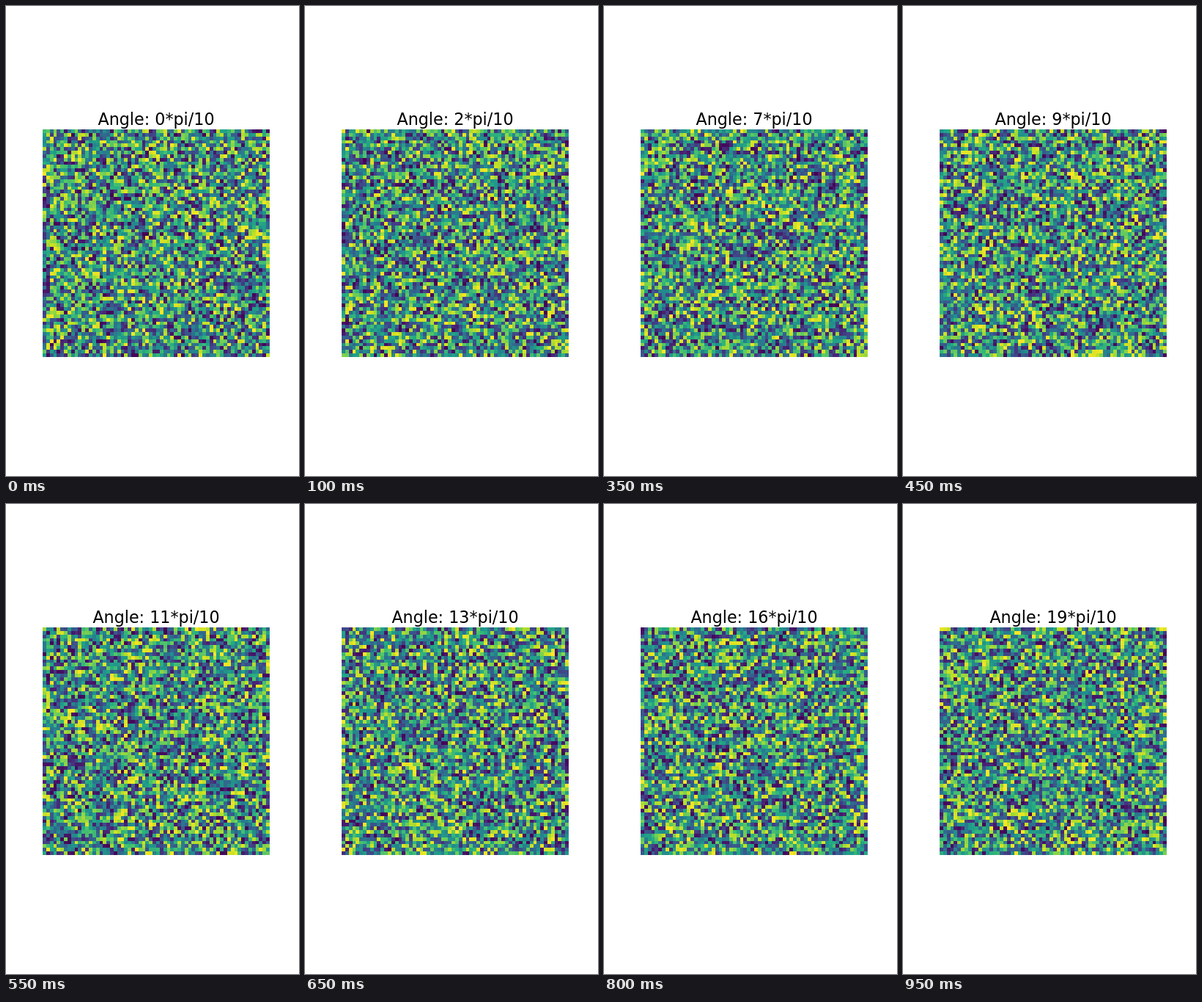
Write an HTML page with a canvas that moves like this. It is 400 px wide and 640 px high and loops after 1 s.

```html
<!DOCTYPE html>
<html lang="en">
<head>
<meta charset="utf-8">
<title>Angle noise</title>
<style>
  html, body { margin: 0; width: 100%; height: 100%; overflow: hidden; background: #fff; }
  canvas, svg { position: absolute; left: 0; top: 0; display: block; }
  text { font: 22.22px "DejaVu Sans", sans-serif; text-anchor: middle; fill: #000; }
</style>
</head>
<body>
<canvas id="grid" width="400" height="640"></canvas>
<svg width="400" height="640" viewBox="0 0 400 640"><text id="title" x="205" y="162">Angle: 0*pi/10</text></svg>
<script>
const LOOP = 1000, STEPS = 20;
const CELLS = 64, LEFT = 50, TOP = 168, SIZE = 310;
const ctx = document.getElementById('grid').getContext('2d');
const title = document.getElementById('title');

// Viridis colour map, evenly spaced stops
const stops = [
  [68, 1, 84], [72, 36, 117], [65, 68, 135], [53, 95, 141], [42, 120, 142],
  [33, 145, 140], [34, 168, 132], [68, 191, 112], [122, 209, 81],
  [189, 223, 38], [253, 231, 37]
];

function viridis(v) {
  const p = v * (stops.length - 1);
  const i = Math.min(Math.floor(p), stops.length - 2);
  const mix = stops[i].map((c, k) => Math.round(c + (stops[i + 1][k] - c) * (p - i)));
  return `rgb(${mix})`;
}

const palette = Array.from({ length: 256 }, (_, i) => viridis(i / 255));
const edge = Array.from({ length: CELLS + 1 }, (_, i) => Math.round(i * SIZE / CELLS));

function seeded(seed) {
  let s = seed;
  return () => {
    s = (s + 0x6D2B79F5) | 0;
    let t = Math.imul(s ^ (s >>> 15), s | 1);
    t ^= t + Math.imul(t ^ (t >>> 7), t | 61);
    return ((t ^ (t >>> 14)) >>> 0) / 4294967296;
  };
}

function draw(step) {
  const rand = seeded(7919 * (step + 1));
  title.textContent = `Angle: ${step}*pi/10`;
  for (let r = 0; r < CELLS; r++) {
    for (let c = 0; c < CELLS; c++) {
      ctx.fillStyle = palette[Math.floor(rand() * 256)];
      ctx.fillRect(LEFT + edge[c], TOP + edge[r], edge[c + 1] - edge[c], edge[r + 1] - edge[r]);
    }
  }
}

let shown = -1;
function tick() {
  const step = Math.floor((performance.now() % LOOP) / LOOP * STEPS);
  if (step !== shown) draw(shown = step);
  requestAnimationFrame(tick);
}
tick();
</script>
</body>
</html>
```
